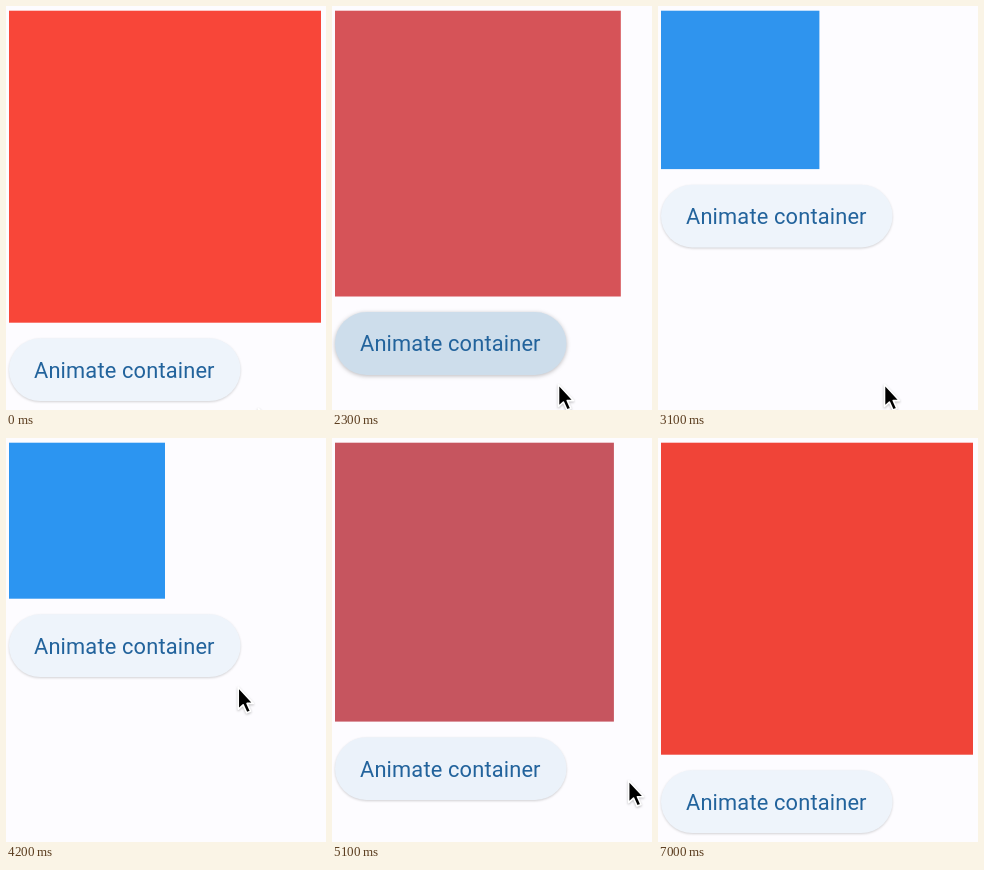
An HTML page that plays this animation: 320 by 404 pixels, repeating every 7.7 s.

```html
<!DOCTYPE html>
<html lang="en">
<head>
<meta charset="utf-8">
<title>Animate container</title>
<style>
  html, body { margin: 0; width: 100%; height: 100%; overflow: hidden; background: #fdfcff; }
  svg { display: block; }
  text { font: 21.84px Roboto, sans-serif; letter-spacing: .156px; fill: #22639c; }
  #cursor { filter: drop-shadow(0 1px 1px rgba(0,0,0,.25)); }
</style>
</head>
<body>
<svg width="320" height="404" viewBox="0 0 320 404">
  <rect id="box" x="3" y="4.7"/>
  <g id="button">
    <rect id="pill" x="3" width="231.5" height="62.8" rx="31.4"/>
    <text x="28" y="39.4">Animate container</text>
  </g>
  <g id="cursor" stroke-linejoin="round" stroke-linecap="round">
    <path id="arrow" transform="translate(0 1)" d="M.5 .5V22.5L5.4 18L9 26L12.8 24.4L9.3 16.6H15.5Z" stroke="#fff" stroke-width="1.6"/>
    <g id="hand" transform="translate(-7 1)" fill="#fff" stroke="#000" stroke-width="1.6">
      <path d="M4.8 1.6Q7.2 .6 8.4 3L10.8 9.6Q13.6 8.4 14.8 10.3Q17.4 9.2 18.7 11.3Q22 11 22.6 13.7Q23.6 18 22 21.4L21 25.2H11Q10 22.4 7.4 20L1.6 14.4Q.6 11.4 4 12L6.6 13.6L3.5 5Q2.5 2.4 4.8 1.6Z"/>
      <path d="M11.8 16L12.2 21.5M15.3 16L15.5 21.5M18.7 16V21.5" fill="none"/>
    </g>
  </g>
</svg>
<script>
const LOOP = 7700, STEP = 100, BIG = 312, SMALL = 156;
const SHRINK_AT = 2151, GROW_AT = 4611;
const $ = id => document.getElementById(id);
const box = $('box'), button = $('button'), pill = $('pill');
const cursor = $('cursor'), arrow = $('arrow'), hand = $('hand');

const RED = [248, 70, 57], RED_LATE = [240, 68, 56], BLUE = [44, 149, 241];
const IDLE = [238, 244, 251], PRESSED = [202, 219, 234];

const clamp = v => Math.min(1, Math.max(0, v));
const lerp = (a, b, k) => a + (b - a) * k;
const mix = (a, b, k) => `rgb(${a.map((v, i) => Math.round(lerp(v, b[i], k)))})`;

// Smooth rise from 0 to 1
function ramp(t, from, length) {
  const k = clamp((t - from) / length);
  return k * k * (3 - 2 * k);
}

function bounceOut(t) {
  if (t < 1 / 2.75) return 7.5625 * t * t;
  if (t < 2 / 2.75) return 7.5625 * (t - 1.5 / 2.75) ** 2 + .75;
  if (t < 2.5 / 2.75) return 7.5625 * (t - 2.25 / 2.75) ** 2 + .9375;
  return 7.5625 * (t - 2.625 / 2.75) ** 2 + .984375;
}

// Button shade: hover, then press, then release
const touch = (t, enter, press) =>
  (.6 * ramp(t, enter, 250) + .4 * ramp(t, press, 150)) * (1 - ramp(t, press + 250, 300));

function draw(t) {
  const growing = t >= GROW_AT;
  const blue = growing
    ? 1 - bounceOut(clamp((t - GROW_AT) / 1030))
    : bounceOut(clamp((t - SHRINK_AT) / 1000));
  const size = lerp(BIG, SMALL, blue);
  box.setAttribute('width', size);
  box.setAttribute('height', size);
  box.setAttribute('fill', mix(growing ? RED_LATE : RED, BLUE, blue));

  const top = size + 20.3;
  const tint = touch(t, 1000, 2000) + touch(t, 4200, 4600);
  button.setAttribute('transform', `translate(0 ${top})`);
  pill.setAttribute('fill', mix(IDLE, PRESSED, tint));
  pill.style.filter = `drop-shadow(0 1px ${1 + 1.5 * tint}px rgba(0,0,0,${.17 + .1 * tint}))`;

  // Enter from below, follow the button up, leave to the right
  const enter = ramp(t, 800, 700), follow = ramp(t, 3500, 800), leave = ramp(t, 4850, 450);
  const x = 252 - 26 * enter + 6 * follow + 110 * leave;
  const y = 401 + 9 * ramp(t, 0, 100) - 33 * enter - 135 * follow + 170 * leave;
  const over = x < 237 && y > top - 7 && y < top + 70;
  cursor.setAttribute('transform', `translate(${x} ${y})`);
  arrow.style.display = over ? 'none' : '';
  hand.style.display = over ? '' : 'none';
}

const start = performance.now();
function tick() {
  const t = (performance.now() - start) % LOOP;
  draw(Math.floor(t / STEP) * STEP);
  requestAnimationFrame(tick);
}
tick();
</script>
</body>
</html>
```
